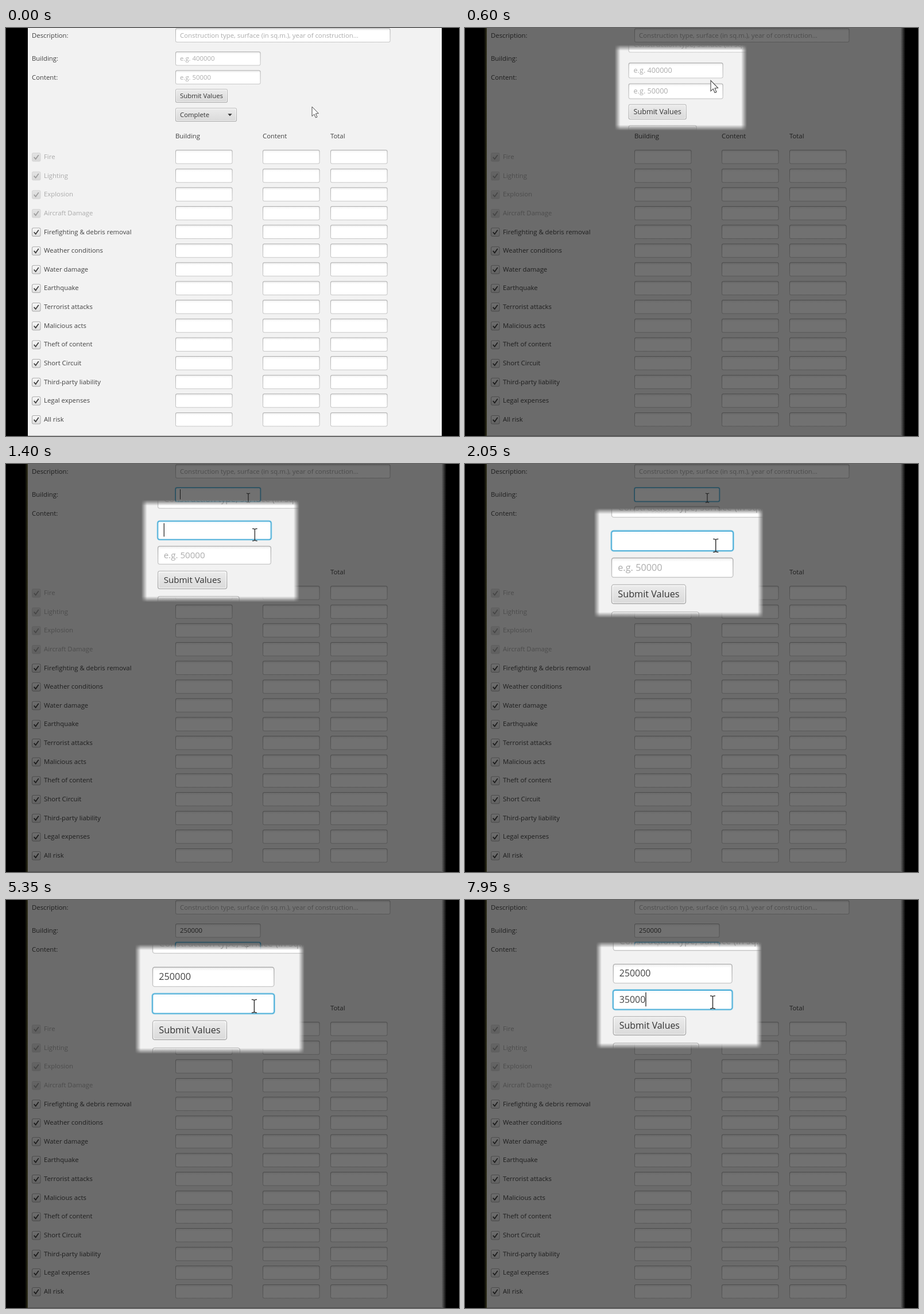
Recreate the animation shown at these times as an HTML page with a canvas. Size 789x710 px, loop 8000 ms.

```html
<!DOCTYPE html>
<html lang="en">
<head>
<meta charset="utf-8">
<title>Insurance form</title>
<style>
  html, body { margin: 0; width: 100%; height: 100%; overflow: hidden; background: #000; }
  canvas { display: block; width: 789px; height: 710px; }
</style>
</head>
<body>
<canvas id="stage" width="789" height="710"></canvas>
<script>
const W = 789, H = 710, LOOP = 8000, STEP = 50;
const ctx = document.getElementById('stage').getContext('2d');
const lens = document.createElement('canvas');
lens.width = W;
lens.height = H;
const lensCtx = lens.getContext('2d');

const FONT = '11.35px "Open Sans", "Noto Sans", sans-serif';
const INK = '#424242', HINT = '#acacac', PAPER = '#f2f2f2';
const COVERS = ['Fire', 'Lighting', 'Explosion', 'Aircraft Damage',
  'Firefighting & debris removal', 'Weather conditions', 'Water damage',
  'Earthquake', 'Terrorist attacks', 'Malicious acts', 'Theft of content',
  'Short Circuit', 'Third-party liability', 'Legal expenses', 'All risk'];
const COLUMNS = [['Building', 295], ['Content', 447], ['Total', 565]];

// Magnified area, the fixed point of its scaling, and its timing
const AREA = { x0: 276, x1: 478, y0: 15.8, y1: 144.6 };
const PIVOT = { x: 388, y: -133 };
const ZOOM = { gain: 0.4325, start: 200, span: 1555, back: 7840 };
const SPREAD = 3, FEATHER = 10, SHADE = 0.555;

const FOCUS = [1200, 5250];
const ENTRY = [
  { text: '250000', keys: [2700, 2850, 3150, 3300, 3400, 3550] },
  { text: '35000', keys: [6800, 7000, 7150, 7450, 7650] }
];
// Times at which the caret turns on (even index) or off (odd index)
const CARET = [1200, 2050, 2550, 4050, 4550, 5000, 5500, 6000, 6500];
const PATH = [[0, 533, 137], [50, 533, 137], [600, 424, 69], [850, 422, 59],
  [3800, 422, 59], [4300, 429, 80], [4650, 419, 88.8]];

const clamp = v => Math.max(0, Math.min(1, v));
const smooth = v => v * v * (3 - 2 * v);

function pointer(t) {
  let i = 0;
  while (i < PATH.length - 2 && t >= PATH[i + 1][0]) i++;
  const [t0, x0, y0] = PATH[i], [t1, x1, y1] = PATH[i + 1];
  const k = smooth(clamp((t - t0) / (t1 - t0)));
  return { x: x0 + (x1 - x0) * k, y: y0 + (y1 - y0) * k };
}

function stateAt(t) {
  return {
    mouse: pointer(t),
    focus: FOCUS.filter(f => t >= f).length - 1,
    caret: CARET.filter(c => t >= c).length % 2 === 1,
    values: ENTRY.map(e => e.text.slice(0, e.keys.filter(k => t >= k).length))
  };
}

function scaleAt(t) {
  const open = clamp((t - ZOOM.start) / ZOOM.span);
  const shut = clamp((t - ZOOM.back) / ZOOM.span);
  return 1 + ZOOM.gain * (open - shut);
}

function box(c, x, y, w, h, r, fill) {
  c.fillStyle = fill;
  c.beginPath();
  c.roundRect(x, y, w, h, r);
  c.fill();
}

function shade(c, y, h, top, bottom) {
  const g = c.createLinearGradient(0, y, 0, y + h);
  g.addColorStop(0, top);
  g.addColorStop(1, bottom);
  return g;
}

function label(c, str, x, mid, color = INK) {
  c.fillStyle = color;
  c.fillText(str, x, mid + 4);
}

function field(c, x, mid, w, focused) {
  const y = mid - 12, h = 24.5;
  if (focused) {
    box(c, x - 1, y - 1, w + 2, h + 2, 4, 'rgba(3,158,211,0.35)');
    box(c, x - 0.3, y - 0.3, w + 0.6, h + 0.6, 3, '#52b0d9');
  } else {
    box(c, x, y, w, h, 3, shade(c, y, h, '#adadad', '#c9c9c9'));
  }
  box(c, x + 1, y + 1, w - 2, h - 2, 2, shade(c, y + 1, 4, focused ? '#f4fafd' : '#efefef', '#fff'));
}

function button(c, x, mid, w, str) {
  const y = mid - 12, h = 24;
  box(c, x, y, w, h, 3, shade(c, y, h, '#bebebe', '#a9a9a9'));
  box(c, x + 1, y + 1, w - 2, h - 2, 2, shade(c, y, h, '#fbfbfb', '#efefef'));
  box(c, x + 2, y + 2, w - 4, h - 4, 2, shade(c, y, h, '#ececec', '#d9d9d9'));
  label(c, str, x + 8, mid, '#333');
}

function checkbox(c, mid, disabled) {
  const x = 45, y = mid - 7.5, s = 15.5;
  c.globalAlpha = disabled ? 0.4 : 1;
  box(c, x, y, s, s, 3, '#ababab');
  box(c, x + 1, y + 1, s - 2, s - 2, 2, shade(c, y, s, '#fafafa', '#dcdcdc'));
  c.strokeStyle = '#3c3c3c';
  c.lineWidth = 1.7;
  c.beginPath();
  c.moveTo(x + 3.7, mid + 0.2);
  c.lineTo(x + 6.7, mid + 3.6);
  c.lineTo(x + 11.8, mid - 3.6);
  c.stroke();
  c.globalAlpha = 1;
}

function entry(c, i, mid, hint, s) {
  const focused = s.focus === i, value = s.values[i];
  field(c, 295, mid, 148.5, focused);
  if (value) label(c, value, 303, mid);
  else if (!focused) label(c, hint, 303, mid, HINT);
  if (focused && s.caret) {
    c.fillStyle = '#333';
    c.fillRect(303 + c.measureText(value).width, mid - 9, 1, 17.5);
  }
}

function arrow(c, x, y) {
  const outline = [[0, 0], [0, 16.5], [3.8, 13], [6.4, 19], [9, 17.9], [6.4, 12], [11.3, 11.6]];
  c.beginPath();
  outline.forEach(([dx, dy]) => c.lineTo(x + dx, y + dy));
  c.closePath();
  c.fillStyle = '#fff';
  c.fill();
  c.strokeStyle = '#4a4a4a';
  c.lineWidth = 1;
  c.stroke();
}

function beam(c, x, y) {
  c.strokeStyle = '#3a3a3a';
  c.lineWidth = 1.1;
  c.beginPath();
  c.moveTo(x, y - 7);
  c.lineTo(x, y + 7);
  for (const d of [-1, 1]) {
    c.moveTo(x - 3.2, y + 8 * d);
    c.quadraticCurveTo(x, y + 8 * d, x, y + 6.5 * d);
    c.quadraticCurveTo(x, y + 8 * d, x + 3.2, y + 8 * d);
  }
  c.stroke();
}

function form(c, s) {
  c.font = FONT;
  c.fillStyle = '#000';
  c.fillRect(0, 0, W, H);
  c.fillStyle = PAPER;
  c.fillRect(38, 0, 721, H);
  c.fillStyle = '#b4b4b4';
  c.fillRect(38, 709, 721, 1);

  label(c, 'Description:', 45, 12.5);
  label(c, 'Building:', 45, 53);
  label(c, 'Content:', 45, 85.5);
  field(c, 295, 12.5, 374.5);
  label(c, 'Construction type, surface (in sq.m.), year of construction...', 303, 12.5, HINT);
  entry(c, 0, 53, 'e.g. 400000', s);
  entry(c, 1, 85.5, 'e.g. 50000', s);
  button(c, 295, 118, 91, 'Submit Values');
  button(c, 295, 151, 107, 'Complete');
  c.fillStyle = '#333';
  c.beginPath();
  c.moveTo(386.3, 149.3);
  c.lineTo(393.7, 149.3);
  c.lineTo(390, 153.3);
  c.fill();

  for (const [name, x] of COLUMNS) label(c, name, x, 187.5);
  COVERS.forEach((name, i) => {
    const mid = 224 + i * 32.64, disabled = i < 4;
    checkbox(c, mid + 0.5, disabled);
    label(c, name, 66, mid, disabled ? '#ababab' : INK);
    for (const [, x] of COLUMNS) field(c, x, mid, 99.5);
  });

  const { x, y } = s.mouse;
  const overField = x > 295 && x < 443 && ((y > 41 && y < 65.5) || (y > 73.5 && y < 98));
  (overField ? beam : arrow)(c, x, y);
}

function strip(x0, x1, from, to) {
  const g = ctx.createLinearGradient(x0, 0, x1, 0);
  g.addColorStop(0, from);
  g.addColorStop(1, to);
  ctx.fillStyle = g;
  ctx.fillRect(x0, 0, x1 - x0, H);
}

function dim(amount) {
  ctx.fillStyle = `rgba(0,0,0,${SHADE * amount})`;
  ctx.fillRect(0, 0, W, H);
  ctx.globalAlpha = amount;
  strip(33, 38, '#000', '#34331c');
  strip(759, 767, '#666', '#000');
  ctx.globalAlpha = 1;
}

// Keeps only the lens between a and b along one axis, with soft ends
function feather(a, b, vertical) {
  const g = vertical ? lensCtx.createLinearGradient(0, a, 0, b) : lensCtx.createLinearGradient(a, 0, b, 0);
  const k = FEATHER / (b - a);
  g.addColorStop(0, 'rgba(0,0,0,0)');
  g.addColorStop(k, '#000');
  g.addColorStop(1 - k, '#000');
  g.addColorStop(1, 'rgba(0,0,0,0)');
  lensCtx.fillStyle = g;
  lensCtx.fillRect(0, 0, W, H);
}

function magnify(state, scale, amount) {
  const mx = x => PIVOT.x + (x - PIVOT.x) * scale;
  const my = y => PIVOT.y + (y - PIVOT.y) * scale;
  lensCtx.globalCompositeOperation = 'source-over';
  lensCtx.setTransform(scale, 0, 0, scale, mx(0), my(0));
  form(lensCtx, state);
  lensCtx.setTransform(1, 0, 0, 1, 0, 0);
  lensCtx.globalCompositeOperation = 'destination-in';
  feather(mx(AREA.x0) - SPREAD, mx(AREA.x1) + SPREAD, false);
  feather(my(AREA.y0) - SPREAD, my(AREA.y1) + SPREAD, true);
  ctx.globalAlpha = amount;
  ctx.drawImage(lens, 0, 0);
  ctx.globalAlpha = 1;
}

function draw(now) {
  const t = Math.floor((now % LOOP) / STEP) * STEP;
  const state = stateAt(t);
  const amount = clamp((t - 50) / 500);
  form(ctx, state);
  if (amount > 0) {
    dim(amount);
    magnify(state, scaleAt(t), amount);
  }
  requestAnimationFrame(draw);
}
requestAnimationFrame(draw);
</script>
</body>
</html>
```
